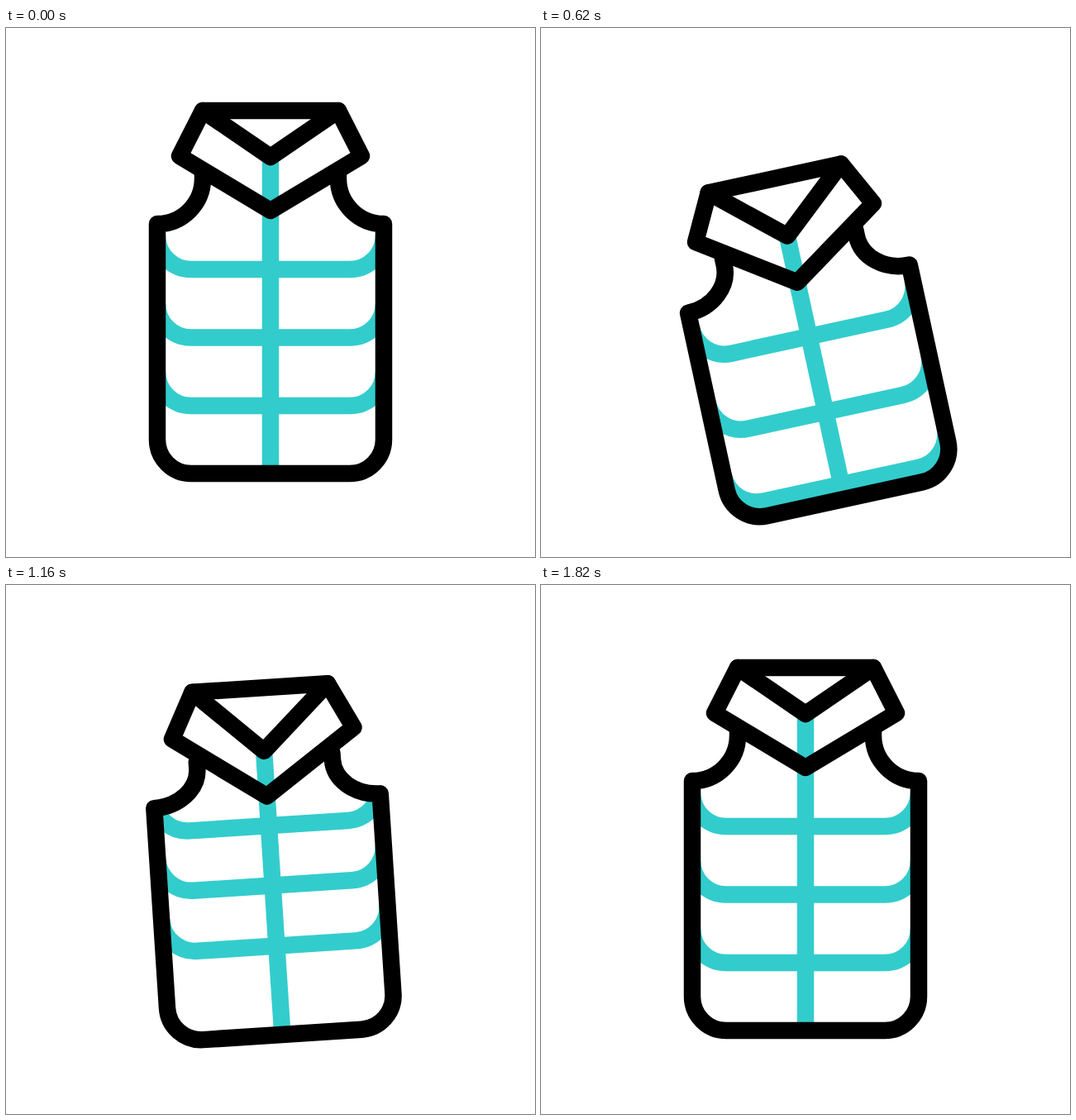
Recreate the animation shown at these times as an HTML page. Size 640x640 px, loop 2.4 s.

```html
<!DOCTYPE html>
<html lang="en">
<head>
<meta charset="utf-8">
<title>Vest</title>
<style>
  html, body { margin: 0; width: 100%; height: 100%; overflow: hidden; background: #fff; }
  svg { display: block; width: 100%; height: 100%; }
  path { fill: none; stroke-width: 20.5; }
  .teal { stroke: #3cc; }
  .black { stroke: #000; stroke-linecap: round; stroke-linejoin: round; }
</style>
</head>
<body>
<svg viewBox="0 0 640 640">
  <clipPath id="inside"><path id="mask"/></clipPath>
  <g id="vest">
    <g class="teal">
      <path id="zip"/>
      <g clip-path="url(#inside)">
        <path class="stripe"/>
        <path class="stripe"/>
        <path class="stripe"/>
      </g>
    </g>
    <g class="black">
      <path id="body"/>
      <path id="collar"/>
      <path id="neck"/>
    </g>
  </g>
</svg>
<script>
  const LOOP = 2400;
  const STRIPE_LAG = 42.5;

  const vest = document.getElementById('vest');
  const stripes = document.querySelectorAll('.stripe');
  const draw = (id, d) => document.getElementById(id).setAttribute('d', d);

  // Smooth progress from 0 to 1 between two times
  function ease(t, from, to) {
    const u = Math.min(1, Math.max(0, (t - from) / (to - from)));
    return u * u * (3 - 2 * u);
  }

  // Rise to 1 at the peak, then fall back to 0
  const bump = (t, start, peak, end) => ease(t, start, peak) - ease(t, peak, end);

  // Swing from rest to rest, each turn opposite to the last and smaller by decay
  function swing(t, size, decay, start, ...turns) {
    let value = 0, from = start;
    turns.forEach((to, i) => {
      const goal = i < turns.length - 1 ? size * (-decay) ** i : 0;
      value += (goal - value) * ease(t, from, to);
      from = to;
    });
    return value;
  }

  function render(t) {
    const tilt = swing(t, -20.2, 0.495, 0, 480, 900, 1217, 1510, 1820);
    const lift = swing(t, 62.5, 0.625, 0, 480, 900, 1310, 1810);
    const crouch = bump(t, 0, 480, 900);
    const settle = bump(t, 900, 1180, 1820);

    const top = 100 + 57 * crouch + 19 * settle;
    const dip = 10.4 * (crouch + settle);
    const neckY = top + 56 + 2 * dip;
    const pointY = top + 121 + dip;
    const armY = top + 82 + dip;
    const arm = `a55 ${55 - dip} 0 0 1 -55 `;

    vest.setAttribute('transform', `translate(0 ${lift}) rotate(${tilt} 320 317)`);

    const outline = `M238 ${armY - 8}v8${arm}${55 - dip}V498` +
      `a41 41 0 0 0 41 41H416a41 41 0 0 0 41 -41V${top + 137}` +
      `${arm}${dip - 55}v-8`;
    draw('body', outline);
    draw('mask', outline + 'Z');
    draw('zip', `M320 ${neckY}V539`);
    draw('collar', `M238 ${top}H402L430 ${top + 55}L320 ${pointY}L210 ${top + 55}Z`);
    draw('neck', `M238 ${top}L320 ${neckY}L402 ${top}`);

    stripes.forEach((stripe, i) => {
      const sway = swing(t - i * STRIPE_LAG, 67, 0.6, 68, 490, 950, 1357, 1730);
      stripe.setAttribute('d',
        `M183 ${251 + 82.5 * i + sway}a41 41 0 0 0 41 41H416a41 41 0 0 0 41 -41`);
    });
  }

  function tick() {
    render(performance.now() % LOOP);
    requestAnimationFrame(tick);
  }
  tick();
</script>
</body>
</html>
```
